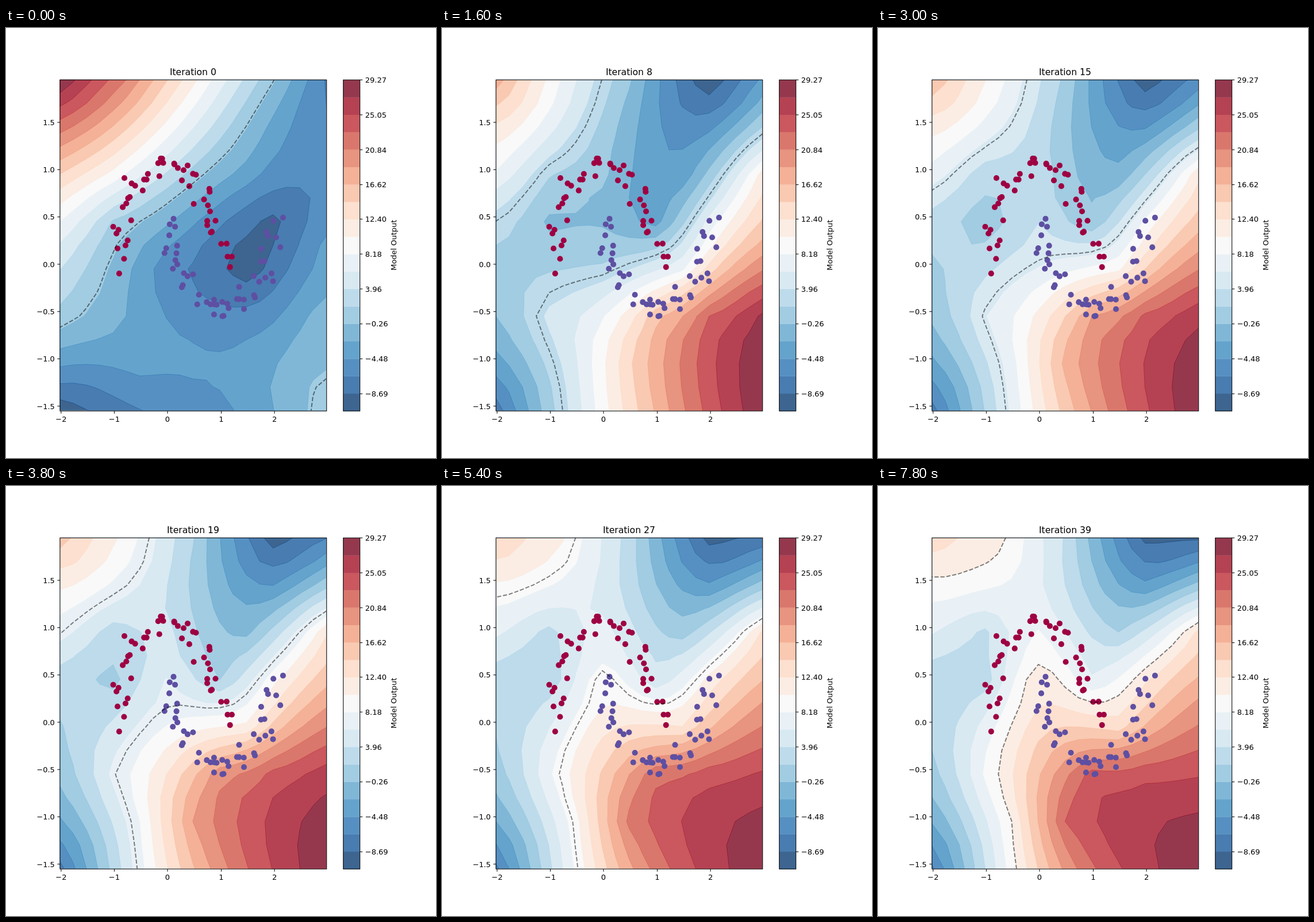
Write an HTML page with a canvas that moves like this. It is 748x748 px and loops after 8000 ms.

```html
<!DOCTYPE html>
<html lang="en">
<head>
<meta charset="utf-8">
<title>Decision boundary training</title>
<style>
  html, body { margin: 0; width: 100%; height: 100%; overflow: hidden; background: #fff; }
  canvas, svg { position: absolute; left: 0; top: 0; width: 100%; height: 100%; }
  text { font: 13.89px "DejaVu Sans", sans-serif; fill: #000; }
  #title { font-size: 16.67px; }
  .line { fill: none; stroke: #000; stroke-width: 1.11; }
</style>
</head>
<body>
<canvas width="748" height="748"></canvas>
<svg viewBox="0 0 800 800">
  <g id="axes"></g>
  <text id="title" x="348" y="87.7" text-anchor="middle">Iteration 0</text>
  <text transform="translate(726 404) rotate(-90)" text-anchor="middle">Model Output</text>
</svg>
<script>
// The figure is laid out on an 800 by 800 sheet
const SHEET = 800;
const PLOT = { x: 100, y: 96, w: 496, h: 616 };
const STEP_MS = 200, STEPS = 40, MIDDLE_STEP = 8, BANDS = 19;
const COLS = 21, ROWS = 15;
const canvas = document.querySelector('canvas');
const ctx = canvas.getContext('2d');
const title = document.getElementById('title');

const range = n => Array.from({ length: n }, (_, i) => i);
const mix = (a, b, p) => a + (b - a) * p;
const easeOut = u => Math.sin(u * Math.PI / 2);
const plotX = x => PLOT.x + (x + 2.025) * PLOT.w / 5;
const plotY = y => PLOT.y + PLOT.h - (y + 1.547) * PLOT.h / 3.5;
const nodeX = i => PLOT.x + i * PLOT.w / (COLS - 1);
const nodeY = j => PLOT.y + j * PLOT.h / (ROWS - 1);

// Diverging colour scale, from low to high output
const STOPS = ['053061', '2166ac', '4393c3', '92c5de', 'd1e5f0', 'f7f7f7',
  'fddbc7', 'f4a582', 'd6604d', 'b2182b', '67001f']
  .map(hex => [0, 2, 4].map(i => parseInt(hex.slice(i, i + 2), 16)));

function bandColor(k, alpha) {
  const pos = (k + 0.5) / BANDS * 10, i = Math.floor(pos);
  const rgb = STOPS[i].map((c, n) =>
    Math.round(mix(255, mix(c, STOPS[i + 1][n], pos - i), alpha)));
  return `rgb(${rgb})`;
}
const fills = range(BANDS).map(k => bandColor(k, 0.8));
const edges = range(BANDS).map(k => bandColor(k, 1));

// Key points of the surface: column, row, then output in bands at the start, middle and end
const KEY_POINTS = [
  [0, 0, 19, 13.6, 11.6], [5, 0, 15, 8.9, 10.4], [10, 0, 10.3, 5.2, 6.9],
  [16, 0, 5.2, 0.1, 0.7], [20, 0, 1.9, 3.2, 0.8], [16, 2, 3.7, 2.7, 3.2],
  [0, 4, 12, 8.9, 8.1], [4, 4, 9.7, 6.1, 6.8], [8, 4, 6.9, 5.3, 9.1],
  [14, 4, 3.6, 3.3, 6], [20, 4, 2.1, 10.4, 11.3],
  [4, 6, 5.9, 4.8, 6.4], [8, 6, 4.2, 4.9, 10.9], [12, 6, 2.2, 3.6, 8.1],
  [16, 6, 0.7, 8.4, 10.8], [20, 7, 3.3, 13.3, 14.2],
  [8, 8, 2.4, 6.2, 11.6], [14, 8, 0.4, 8.8, 11.5],
  [0, 10, 5.7, 5, 5.6], [4, 10, 4.4, 7.3, 9.2], [12, 10, 2.4, 12.7, 16.4],
  [16, 10, 2.8, 16, 16.7], [20, 10, 4.6, 18.2, 16.9],
  [6, 12, 3.4, 7.9, 10], [10, 12, 3.2, 11.8, 16],
  [0, 14, 0.3, 1.4, 1.8], [12, 14, 2.7, 13.1, 15.8], [20, 14, 5.6, 18.8, 18.8]];
const ZERO_LEVELS = [5.12, 6.6, 10];

// Gaussian elimination with pivoting
function solve(matrix, values) {
  const rows = matrix.map((row, i) => [...row, values[i]]);
  const n = rows.length;
  for (let c = 0; c < n; c++) {
    let best = c;
    for (let r = c; r < n; r++) if (Math.abs(rows[r][c]) > Math.abs(rows[best][c])) best = r;
    [rows[c], rows[best]] = [rows[best], rows[c]];
    for (let r = 0; r < n; r++) {
      if (r === c) continue;
      const f = rows[r][c] / rows[c][c];
      for (let k = c; k <= n; k++) rows[r][k] -= f * rows[c][k];
    }
  }
  return rows.map((row, i) => row[n] / row[i]);
}

// Radial interpolation with a linear part, passing through all key points
function surface(state) {
  const basis = (i, j) => [
    ...KEY_POINTS.map(([c, r]) => Math.hypot(nodeX(i) - nodeX(c), nodeY(j) - nodeY(r)) / 100),
    1, i / COLS, j / ROWS];
  const n = KEY_POINTS.length;
  const matrix = KEY_POINTS.map(([c, r]) => basis(c, r));
  for (let t = n; t < n + 3; t++) matrix.push([...matrix.slice(0, n).map(row => row[t]), 0, 0, 0]);
  const weights = solve(matrix, [...KEY_POINTS.map(p => p[2 + state]), 0, 0, 0]);
  const grid = range(ROWS).map(j => range(COLS).map(i =>
    basis(i, j).reduce((sum, b, k) => sum + b * weights[k], 0)));
  return { grid, zero: ZERO_LEVELS[state] };
}
const [first, middle, last] = range(3).map(surface);

function surfaceAt(step) {
  const early = step < MIDDLE_STEP;
  const [a, b] = early ? [first, middle] : [middle, last];
  const p = easeOut(early ? step / MIDDLE_STEP : (step - MIDDLE_STEP) / (STEPS - 1 - MIDDLE_STEP));
  return {
    grid: a.grid.map((row, j) => row.map((v, i) => mix(v, b.grid[j][i], p))),
    zero: mix(a.zero, b.zero, p)
  };
}

// Mersenne Twister giving 32-bit integers
function twister(seed) {
  const N = 624, s = [seed];
  for (let i = 1; i < N; i++) s[i] = (Math.imul(1812433253, s[i - 1] ^ (s[i - 1] >>> 30)) + i) | 0;
  let at = 0;
  return () => {
    const y = (s[at] & 0x80000000) | (s[(at + 1) % N] & 0x7fffffff);
    let v = s[at] = s[(at + 397) % N] ^ (y >>> 1) ^ (y & 1 ? 0x9908b0df : 0);
    at = (at + 1) % N;
    v ^= v >>> 11;
    v ^= (v << 7) & 0x9d2c5680;
    v ^= (v << 15) & 0xefc60000;
    return (v ^ (v >>> 18)) >>> 0;
  };
}

// Two interleaved half circles in shuffled order, with Gaussian noise
function makeMoons(count, noise, seed) {
  const next = twister(seed);
  const signed = () => ((next() >>> 5) * 67108864 + (next() >>> 6)) / 2 ** 52 - 1;
  const order = range(count), half = count / 2;
  for (let i = count - 1; i > 0; i--) {
    const mask = 2 ** (32 - Math.clz32(i)) - 1;
    let j;
    do j = next() & mask; while (j > i);
    [order[i], order[j]] = [order[j], order[i]];
  }
  return order.map(n => {
    const upper = n < half, angle = (n % half) * Math.PI / (half - 1);
    let a, b, r2;
    do { a = signed(); b = signed(); r2 = a * a + b * b; } while (r2 >= 1 || r2 === 0);
    const f = noise * Math.sqrt(-2 * Math.log(r2) / r2);
    const x = Math.cos(angle), y = Math.sin(angle);
    return { upper, x: (upper ? x : 1 - x) + f * b, y: (upper ? y : 0.5 - y) + f * a };
  });
}
const samples = makeMoons(100, 0.1, 1337);

// For one level: the cell polygons above it and the boundary segments
function contour(grid, level) {
  const polygons = [], segments = [];
  for (let j = 0; j < ROWS - 1; j++) {
    for (let i = 0; i < COLS - 1; i++) {
      const corners = [[i, j], [i + 1, j], [i + 1, j + 1], [i, j + 1]]
        .map(([c, r]) => ({ x: nodeX(c), y: nodeY(r), v: grid[r][c] }));
      const polygon = [], cuts = [];
      corners.forEach((a, k) => {
        const b = corners[(k + 1) % 4];
        if (a.v >= level) polygon.push([a.x, a.y]);
        if ((a.v >= level) !== (b.v >= level)) {
          const p = (level - a.v) / (b.v - a.v);
          const cut = [mix(a.x, b.x, p), mix(a.y, b.y, p)];
          polygon.push(cut);
          cuts.push(cut);
        }
      });
      if (polygon.length) polygons.push(polygon);
      for (let k = 0; k < cuts.length; k += 2) segments.push([cuts[k], cuts[k + 1]]);
    }
  }
  return { polygons, segments };
}

// Joins segments end to end so that dashes run on without a break
function joinLines(segments) {
  const key = p => p.map(c => c.toFixed(2)).join();
  const byEnd = new Map();
  for (const s of segments) {
    for (const p of s) byEnd.set(key(p), [...(byEnd.get(key(p)) || []), s]);
  }
  const used = new Set(), lines = [];
  const follow = (s, from) => {
    const line = [from];
    while (s) {
      used.add(s);
      from = key(s[0]) === key(from) ? s[1] : s[0];
      line.push(from);
      s = byEnd.get(key(from)).find(next => !used.has(next));
    }
    lines.push(line);
  };
  for (const s of segments) {
    const end = s.find(p => byEnd.get(key(p)).length === 1);
    if (end && !used.has(s)) follow(s, end);
  }
  for (const s of segments) if (!used.has(s)) follow(s, s[0]);
  return lines;
}

function trace(paths, close) {
  ctx.beginPath();
  for (const path of paths) {
    path.forEach(([x, y], n) => n ? ctx.lineTo(x, y) : ctx.moveTo(x, y));
    if (close) ctx.closePath();
  }
}

function draw(step) {
  const { grid, zero } = surfaceAt(step);
  const scale = canvas.width / SHEET;
  ctx.save();
  ctx.scale(scale, scale);
  ctx.clearRect(0, 0, SHEET, SHEET);
  ctx.beginPath();
  ctx.rect(PLOT.x, PLOT.y, PLOT.w, PLOT.h);
  ctx.clip();
  ctx.fillStyle = fills[0];
  ctx.fillRect(PLOT.x, PLOT.y, PLOT.w, PLOT.h);
  ctx.lineWidth = 0.6;
  for (let k = 1; k < BANDS; k++) {
    const { polygons, segments } = contour(grid, k);
    trace(polygons, true);
    ctx.fillStyle = fills[k];
    ctx.fill();
    trace(segments);
    ctx.strokeStyle = edges[k < BANDS / 2 ? k - 1 : k];
    ctx.stroke();
  }
  for (const { upper, x, y } of samples) {
    ctx.fillStyle = upper ? '#9e0142' : '#5e4fa2';
    ctx.beginPath();
    ctx.arc(plotX(x), plotY(y), 5.4, 0, 2 * Math.PI);
    ctx.fill();
  }
  trace(joinLines(contour(grid, zero).segments));
  ctx.strokeStyle = 'rgba(0, 0, 0, 0.5)';
  ctx.lineWidth = 2.08;
  ctx.setLineDash([7.7, 3.33]);
  ctx.stroke();
  ctx.restore();
  title.textContent = `Iteration ${step}`;
}

function buildAxes() {
  const parts = [];
  const left = 100.5, right = 596.5, top = 96.5, bottom = 712.5;
  const barLeft = 627.5, barRight = 658.5, tick = 4.86;
  const snap = v => Math.floor(v) + 0.5;
  const line = d => parts.push(`<path class="line" d="${d}"/>`);
  const label = (x, y, anchor, s) =>
    parts.push(`<text x="${x}" y="${y}" text-anchor="${anchor}">${s.replace('-', '\u2212')}</text>`);

  const bandHeight = (bottom - top) / BANDS;
  fills.forEach((color, k) => parts.push(`<rect x="${barLeft}" y="${bottom - (k + 1) * bandHeight}"
    width="${barRight - barLeft}" height="${bandHeight + 0.3}" fill="${color}"/>`));
  line(`M${left} ${top}H${right}V${bottom}H${left}Z`);
  line(`M${barLeft} ${top}H${barRight}V${bottom}H${barLeft}Z`);
  for (let v = -2; v <= 2; v++) {
    const x = snap(plotX(v));
    line(`M${x} ${bottom}v${tick}`);
    label(x, 733, 'middle', String(v));
  }
  for (let v = -1.5; v <= 1.5; v += 0.5) {
    const y = snap(plotY(v));
    line(`M${left} ${y}h${-tick}`);
    label(left - 2 * tick, y + 5.1, 'end', v.toFixed(1));
  }
  for (let n = 0; n < 10; n++) {
    const y = snap(top + 2 * n * bandHeight);
    line(`M${barRight} ${y}h${tick}`);
    label(barRight + 2 * tick, y + 5.1, 'start', (29.272 - 4.2184 * n).toFixed(2));
  }
  document.getElementById('axes').innerHTML = parts.join('');
}

buildAxes();
const start = performance.now();
let shown = -1;
function tick() {
  const step = Math.floor((performance.now() - start) / STEP_MS) % STEPS;
  if (step !== shown) draw(shown = step);
  requestAnimationFrame(tick);
}
tick();
</script>
</body>
</html>
```
